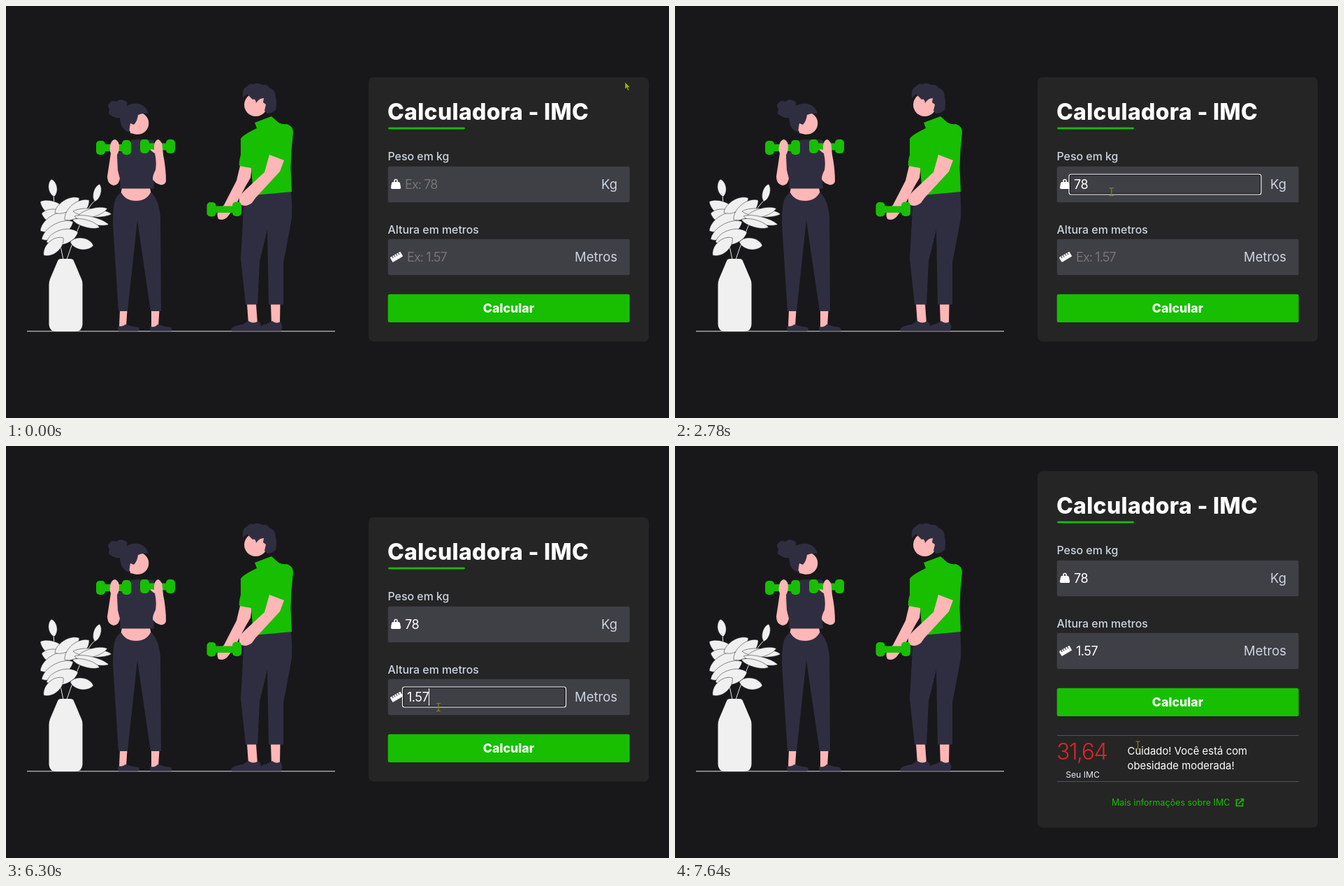
These frames come from a looping animation (949x590 px, 8000 ms). An HTML page:

```html
<!DOCTYPE html>
<html lang="pt">
<head>
<meta charset="utf-8">
<style>
  html, body { margin: 0; width: 100%; height: 100%; overflow: hidden; background: #18181a; }
  svg { display: block; width: 949px; height: 590px; font-family: Inter, "Open Sans", sans-serif; }
  .dark { fill: #2f2e41; }
  .skin { fill: #ffb6b6; }
  .green { fill: #17bf00; }
  .plant { fill: #f0f0f0; }
  .stem { fill: none; stroke: #f0f0f0; }
  #leaves path { stroke: #18181a; stroke-width: .5; }
  .box { fill: #3f3f46; }
  .label { font-size: 15.9px; font-weight: 500; fill: #cbd5e1; }
  .unit { font-size: 18.5px; fill: #cbd5e1; text-anchor: end; }
  .value { font-size: 18px; }
  .rule { stroke: #52525b; }
  .ring { fill: none; stroke: #18181a; stroke-width: 1.5; }
  .ring.outer { stroke: #f4f4f5; stroke-width: 1.2; }
</style>
</head>
<body>
<svg viewBox="0 0 949 590">
  <path d="M30 465.800H471" stroke="#e6e6e6"/>

  <!-- plant -->
  <g class="plant">
    <path class="stem" d="M82 363Q75 330 72 310T68 270M87 363Q98 330 108 308T129 277"/>
    <g id="leaves"></g>
    <path d="M74 365Q75 362 79 362H92Q96 362 97 365L108 391Q109.500 394 109.500 398V456Q109 466 99 466H72Q62 466 61.500 456V399Q61.500 395 63 391Z"/>
  </g>

  <!-- woman -->
  <g>
    <path class="skin" d="M163 436H173.500L172 459H162ZM208 436H219.500L218 460H208Z"/>
    <path class="dark" d="M161 458Q166 460 171 456Q180 459 189 460Q193 464 189 465.500H161Q159 462 161 458ZM207 459Q213 461 217 456Q226 459 235 460Q239 463 237 465.500H207Q205 462 207 459Z"/>
    <path class="skin" d="M166 260H206L208 270Q199 281 186 281Q172 280 164 270Z"/>
    <path class="dark" d="M165 267Q171 279 186 279Q201 279 207 267Q219 276 221 303L222 437H207L188 307L174 437H161L153 312Q153 284 157 276Q160 270 165 267Z"/>
    <path class="dark" d="M179 192Q195 190 211 192L219 210L215 235Q210 249 212 261.500H163Q165 248 160 235L159 212Q165 208 168 203L179 202Z"/>
    <circle class="skin" cx="188.500" cy="168" r="15.800"/>
    <path class="skin" d="M176 165H188V184L178 182Z"/>
    <path class="dark" d="M163 160Q155 161 150 156Q145 155 148 148Q144 142 149 138Q153 134 158 137Q163 132 168 135Q175 136 173 143Q180 139 190 140Q201 143 204 154Q196 153 189 156Q188 165 183 170L178 168Q177 174 176 181Q169 178 166 173Q163 166 163 160Z"/>
    <path class="green" d="M135 198H175V208H135ZM198 196.500H237V206.500H198Z"/>
    <g class="green">
      <rect x="129" y="193" width="13" height="20" rx="5"/>
      <rect x="166" y="192" width="13" height="21" rx="5"/>
      <rect x="192" y="191" width="13" height="20" rx="5"/>
      <rect x="229" y="191" width="13" height="20" rx="5"/>
    </g>
    <path class="skin" d="M149 201Q150 192 156 191Q162 193 162 202Q162 209 159 213L160 235L163 247Q161 257 154 257Q145 255 145 244L150 211Q148 207 149 201ZM212 200Q213 192 218 191Q224 194 224 203L225 213Q229 232 229 251Q227 257 221 256Q212 253 210 248Q210 242 214 235Q216 223 213 211Q206 207 207 205L212 206Z"/>
  </g>

  <!-- man -->
  <g>
    <path class="skin" d="M345 427H358L360 455H347ZM379 427H392.500L392 455H380Z"/>
    <path class="dark" d="M322 463Q324 458 339 456L347 451Q354 456 361 451Q367 457 367 465.500H323ZM364 465.500Q362 457 374 455L381 451Q387 456 393 452Q397 459 394 465.500Z"/>
    <path class="dark" d="M341 272L408 265Q410 290 409 304L397 368V427.500H376L374 320L363 366L360 427.500H343L336 362Z"/>
    <path class="skin" d="M335 229H352L350 246L343 258L326 290L317 302Q311 308 304 305Q301 299 304 293L312 285L330 250Z"/>
    <path class="green" d="M356 167L380 158L390 167Q396 170 402 169Q411 172 411 181L408.500 207L407.500 232L409 266L354 271L351 232L334 229Q333 224 336 213V190Q340 184 359 175Z"/>
    <path class="skin" d="M377 213L398 221L392 237L357 275L352 282Q343 289 335 284Q332 276 336 270L343 263L370 238Z"/>
    <circle class="skin" cx="357.500" cy="141.500" r="16.500"/>
    <path class="dark" d="M339 132Q337 119 345 115Q349 110 354 112Q360 109 367 113Q374 112 377 117Q386 120 386 130Q388 139 386 149Q380 154 374 154L370 150L372 141L368 138L369 132Q362 132 358 139Q357 132 353 134L345 126Z"/>
    <path class="green" d="M296 286.500H330V296H296Z"/>
    <rect class="green" x="287.500" y="281" width="13" height="20.500" rx="5"/>
    <rect class="green" x="324" y="280.500" width="13" height="20.500" rx="5"/>
  </g>

  <rect id="card" x="519" y="102" width="401" height="378.500" rx="7" fill="#252525"/>
  <g id="form" fill="#fff">
    <text x="546" y="163" font-size="32" font-weight="800" letter-spacing=".3">Calculadora - IMC</text>
    <rect class="green" x="547" y="173.700" width="110" height="2.800" rx="1.400"/>

    <text class="label" x="546.500" y="221">Peso em kg</text>
    <rect class="box" x="546.700" y="229.700" width="346" height="51.500" rx="2.500"/>
    <path d="M553.500 252H562.500Q563.500 252 564 254L565.200 260Q565 262 563.500 262H552.500Q551 262 550.800 260L552 254Q552.500 252 553.500 252Z"/>
    <circle cx="558" cy="250.700" r="2.200" fill="none" stroke="#fff" stroke-width="1.500"/>
    <text class="unit" x="875" y="262">Kg</text>

    <text class="label" x="546.500" y="326">Altura em metros</text>
    <rect class="box" x="546.700" y="333.700" width="346" height="51.500" rx="2.500"/>
    <g transform="translate(559 359.300) rotate(-30)">
      <rect x="-8.500" y="-4" width="17" height="8" rx="1.200"/>
      <path d="M-5 -4V-.8M-1.700 -4V-.8M1.700 -4V-.8M5 -4V-.8" stroke="#3f3f46" stroke-width="1.100"/>
    </g>
    <text class="unit" x="875" y="366">Metros</text>

    <g id="focus">
      <rect class="ring" id="inner" height="26.600" rx="2"/>
      <rect class="ring outer" id="outer" height="29" rx="3"/>
    </g>
    <text class="value" id="weight" x="571" y="262"></text>
    <text class="value" id="height" x="574" y="366"></text>
    <rect id="caret" width="1" height="25"/>

    <g id="button">
      <rect class="green" x="546.700" y="412.700" width="346" height="40.400" rx="2.500"/>
      <text x="719.500" y="439" font-size="17.800" font-weight="800" text-anchor="middle">Calcular</text>
    </g>
  </g>

  <g id="result" fill="#fff">
    <path class="rule" d="M547 414.500H892.500M547 480.500H892.500"/>
    <text x="546" y="449" font-size="32" font-weight="300" letter-spacing="-1.500" fill="#dc2626">31,64</text>
    <text x="583.500" y="475" font-size="12.200" text-anchor="middle" fill="#e2e8f0">Seu IMC</text>
    <text x="647.500" y="442" font-size="14.900">Cuidado! Você está com</text>
    <text x="647.500" y="462.500" font-size="14.900">obesidade moderada!</text>
    <text class="green" x="625" y="514.500" font-size="12.500">Mais informações sobre IMC</text>
    <path d="M808 506.500H803.500V515.500H812.500V511M806.500 512.500L813 506M809.500 505.500H813.500V509.500" fill="none" stroke="#17bf00" stroke-width="1.700"/>
  </g>

  <g id="pointer">
    <circle id="press" r="10.300" fill="#d7c800" fill-opacity=".62"/>
    <path id="arrow" d="M0 0V10L2.400 8L4.200 12L5.800 11.200L4.200 7.400H7.400Z" fill="#8fb800" stroke="#1c2408" stroke-width=".5"/>
    <path id="beam" d="M-3 -5.500H-1L0 -4.500L1 -5.500H3M0 -4.500V4.500M-3 5.500H-1L0 4.500L1 5.500H3" fill="none" stroke="#85850f" stroke-width="1.200"/>
    <path id="hand" d="M-1 1Q.5 -1 1.500 1V5L5.500 6Q7.500 7 7 9L6 12.500H1L-3.500 7Q-3 5.500 -.5 7Z" fill="#c0e000" stroke="#5d8a00" stroke-width=".6"/>
  </g>
</svg>
<script>
const LOOP = 8000, BLINK = 535;
const $ = id => document.getElementById(id);
const set = (el, attrs) => { for (const k in attrs) el.setAttribute(k, attrs[k]); };
const show = (id, on) => $(id).style.display = on ? '' : 'none';

// Each leaf: tip, base, bulge
const leaves = [
  [65, 248, 69, 273, 8], [134, 255, 127, 280, 7],
  [49, 280, 94, 305, 14], [51, 297, 92, 307, 14], [49, 322, 92, 297, 14],
  [51, 334, 96, 309, 13], [105, 275, 70, 296, 11], [119, 278, 84, 306, 13],
  [151, 298, 96, 294, 8], [145, 290, 102, 302, 8], [147, 313, 98, 301, 7],
  [134, 317, 95, 306, 7], [58, 338, 103, 324, 14], [54, 357, 82, 332, 12],
  [125, 343, 92, 338, 11]
];
$('leaves').innerHTML = leaves.map(([x, y, u, v, w]) => {
  const dx = u - x, dy = v - y, len = Math.hypot(dx, dy);
  const point = (k, side) => `${x + dx * k - dy / len * w * side} ${y + dy * k + dx / len * w * side}`;
  return `<path d="M${x} ${y}C${point(.2, 1)} ${point(.8, 1)} ${u} ${v}C${point(.8, -1)} ${point(.2, -1)} ${x} ${y}"/>`;
}).join('');

// Input fields with their edits: time, text, caret x
const fields = [
  { id: 'weight', hint: 'Ex: 78', x: 564, w: 275, y: 241, from: 1115, to: 3365,
    edits: [[1115, '', 571], [1980, '7', 581], [2120, '78', 592]] },
  { id: 'height', hint: 'Ex: 1.57', x: 567.5, w: 234, y: 345, from: 3365, to: 7240,
    edits: [[3365, '', 575], [4700, '1', 580], [4900, '1.', 585], [5030, '1.5', 595], [5230, '1.57', 605]] }
];

// Pointer path: time, x, y
const path = [
  [520, 886, 109], [1100, 626, 256], [2650, 626, 256], [3310, 614, 354.5],
  [6299, 614, 354.5], [6300, 619, 374], [6840, 662.5, 428.5]
];
const presses = [[1060, 1250], [3310, 3440], [7240, 7640]];

function pointerAt(t) {
  const i = path.findIndex(p => p[0] > t);
  if (i < 0) return path[path.length - 1].slice(1);
  if (i === 0) return path[0].slice(1);
  const [a, x, y] = path[i - 1], [b, u, v] = path[i];
  const k = (t - a) / (b - a), e = k * k * (3 - 2 * k);
  return [x + (u - x) * e, y + (v - y) * e];
}

function drawField(f, t) {
  const [at, text, caretX] = f.edits.filter(e => e[0] <= t).pop() || [0, '', 0];
  const el = $(f.id);
  el.textContent = text || f.hint;
  set(el, { fill: text ? '#fff' : '#757575', 'letter-spacing': text ? -.5 : -.9 });
  if (t < f.from || t >= f.to) return false;
  set($('outer'), { x: f.x, y: f.y, width: f.w });
  set($('inner'), { x: f.x + 1.2, y: f.y + 1.2, width: f.w - 2.4 });
  set($('caret'), { x: caretX, y: f.y + 2 });
  show('caret', Math.floor((t - at) / BLINK) % 2 === 0);
  return true;
}

function draw(t) {
  const done = t >= 7640;
  set($('card'), { y: done ? 36 : 102, height: done ? 510.5 : 378.5 });
  set($('form'), { transform: `translate(0 ${done ? -66 : 0})` });
  show('result', done);

  const focused = fields.map(f => drawField(f, t)).some(Boolean);
  show('focus', focused);
  if (!focused) show('caret', false);

  const dim = done ? 0 : Math.min(1, Math.max(0, (t - 7240) / 200));
  set($('button'), { opacity: 1 - .3 * dim });

  const [x, y] = pointerAt(t);
  const overField = fields.some(f => x > f.x && x < f.x + f.w && y > f.y && y < f.y + 30);
  const overButton = !done && y > 413 && y < 453;
  set($('pointer'), { transform: `translate(${x} ${y})` });
  show('beam', overField || done);
  show('hand', overButton);
  show('arrow', !overField && !overButton && !done);
  show('press', presses.some(([a, b]) => t >= a && t < b));
}

const start = performance.now();
function tick() {
  draw((performance.now() - start) % LOOP);
  requestAnimationFrame(tick);
}
tick();
</script>
</body>
</html>
```
